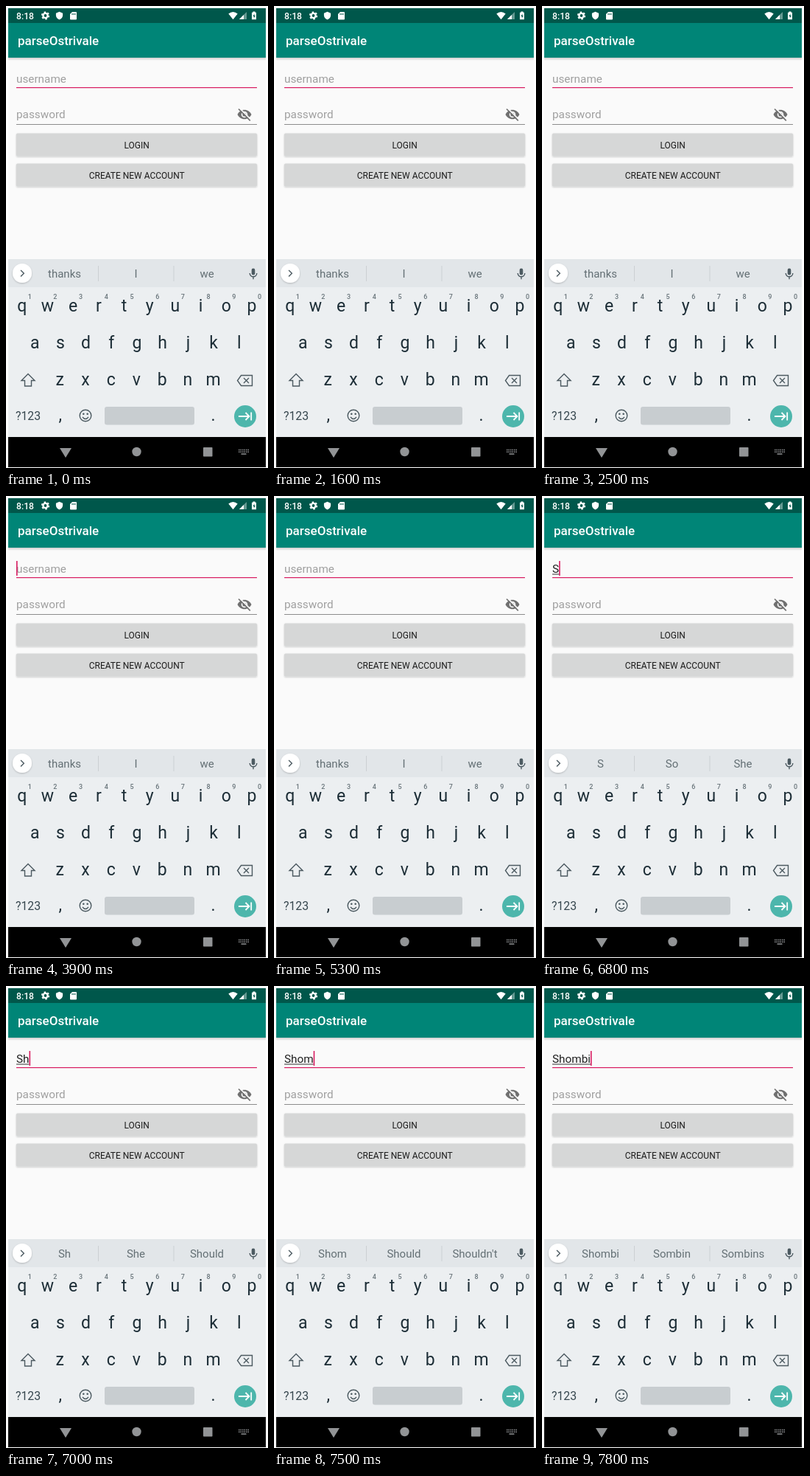
Write an HTML page that moves like this. It is 356 by 626 pixels and loops after 8000 ms.

```html
<!DOCTYPE html>
<html lang="en">
<head>
<meta charset="utf-8">
<title>Login</title>
<style>
  html, body { margin: 0; width: 100%; height: 100%; overflow: hidden; background: #fff; }
  svg { display: block; width: 356px; height: 626px; font-family: Roboto, sans-serif; }
  .mid { text-anchor: middle; }
  .medium { font-weight: 500; }
  .field { font-size: 15.3px; }
  .hint { fill: #a0a0a0; }
  .button { font-size: 12px; fill: #1c1c1c; }
  .word { font-size: 15px; fill: #647075; }
  .key { font-size: 23px; fill: #1c2d36; }
  .digit { font-size: 9px; font-weight: 500; fill: #68747a; }
  .line { fill: none; stroke: #4c5a61; stroke-width: 1.4; }
</style>
</head>
<body>
<svg viewBox="0 0 356 626">
  <defs>
    <linearGradient id="shade" x2="0" y2="1">
      <stop stop-color="#000" stop-opacity=".18"/>
      <stop offset="1" stop-color="#000" stop-opacity="0"/>
    </linearGradient>
    <filter id="lift" x="-20%" y="-20%" width="140%" height="150%">
      <feDropShadow dx="0" dy="1" stdDeviation=".8" flood-opacity=".22"/>
    </filter>
  </defs>

  <rect x="3" y="3" width="350" height="622" fill="#fafafa"/>
  <rect x="3" y="3" width="350" height="20" fill="#00574b"/>
  <rect x="3" y="23" width="350" height="47" fill="#008577"/>
  <rect x="3" y="70" width="350" height="4" fill="url(#shade)"/>

  <g fill="#fff">
    <text class="medium" x="14" y="17.5" font-size="12.2">8:18</text>
    <circle cx="53.5" cy="13" r="3.1" fill="none" stroke="#fff" stroke-width="2.4"/>
    <circle cx="53.5" cy="13" r="4.8" fill="none" stroke="#fff" stroke-width="1.6" stroke-dasharray="2.5 2.53"/>
    <path d="M72.5 7.8l4.6 2v3c0 2.6-1.9 4.7-4.6 5.6c-2.7-.9-4.6-3-4.6-5.6v-3z"/>
    <path d="M90 8h5q1 0 1 1v8.5q0 1-1 1h-7q-1 0-1-1v-6.5z"/>
    <path d="M90 10v2m2-2v2m2-2v2" stroke="#00574b"/>
    <path d="M302.3 10.4q6.2-5 12.4 0L308.5 18.2z"/>
    <path d="M327 8v10h-10z" fill-opacity=".4"/>
    <path d="M323 12v6h-6z"/>
    <path d="M335.5 7.5h3v1.2h1.5v9.6h-6v-9.6h1.5z"/>
    <path d="M337.5 10.5l-2 3.5h1.3v2.5l2-3.5h-1.3z" fill="#00574b"/>
    <text class="medium" x="16" y="53" font-size="17">parseOstrivale</text>
  </g>

  <rect x="14" y="110" width="327" height="1.2" fill="#d81b60"/>
  <text class="field hint" id="hint" x="14" y="104">username</text>
  <text class="field" id="typed" x="14" y="104" fill="#222"></text>
  <rect id="rule" x="14" y="105.5" height="1" fill="#333"/>
  <rect id="caret" y="88" width="1.6" height="20" fill="#d81b60"/>

  <text class="field hint" x="14" y="152">password</text>
  <rect x="14" y="160" width="327" height="1" fill="#8c8c8c"/>
  <g fill="#707070">
    <path d="M314.5 147c1.6-3.7 5.3-6.3 9.5-6.3s7.9 2.6 9.5 6.3c-1.6 3.7-5.3 6.3-9.5 6.3s-7.9-2.6-9.5-6.3z"/>
    <circle cx="324" cy="147" r="4.3" fill="#fafafa"/>
    <circle cx="324" cy="147" r="2.6"/>
    <path d="M317.5 138.7l15.5 15.5" stroke="#fafafa" stroke-width="1.8"/>
    <path d="M316 139.5l15.8 15.8" stroke="#707070" stroke-width="1.7"/>
  </g>

  <g fill="#d6d7d7" filter="url(#lift)">
    <rect x="14" y="172.5" width="327" height="31" rx="1.5"/>
    <rect x="14" y="213.5" width="327" height="31" rx="1.5"/>
  </g>
  <text class="button mid" x="177.7" y="192.5">LOGIN</text>
  <text class="button mid" x="177.7" y="233.5">CREATE NEW ACCOUNT</text>

  <rect x="3" y="343" width="350" height="241" fill="#eceff1"/>
  <rect x="3" y="343" width="350" height="38" fill="#e2e6e9"/>
  <circle cx="22" cy="362" r="13" fill="#fff" filter="url(#lift)"/>
  <path class="line" d="M20 358l4.3 4.3l-4.3 4.3"/>
  <path d="M125.5 352v21M228 352v21" stroke="#cbd0d3"/>
  <g id="words"></g>
  <rect x="333.7" y="355.5" width="4.6" height="9" rx="2.3" fill="#4c5a61"/>
  <path class="line" d="M331.2 362a4.8 4.8 0 0 0 9.6 0M336 367v3.3"/>
  <g id="keys"></g>

  <path class="line" d="M30 498.5l9 9h-4.5v7.5h-9v-7.5h-4.5z"/>
  <path class="line" d="M319.5 500.5h15v14h-15l-5-7z"/>
  <path class="line" d="M323 504l7 7m0-7l-7 7"/>
  <text x="13" y="561" font-size="15.8" fill="#37474f">?123</text>
  <circle class="line" cx="108" cy="555" r="7.8"/>
  <path class="line" d="M104 557q4 5 8 0"/>
  <g fill="#4c5a61"><circle cx="105.3" cy="552.8" r="1.3"/><circle cx="110.7" cy="552.8" r="1.3"/></g>
  <rect x="134" y="543" width="122" height="24.5" rx="3" fill="#c8cdd0"/>
  <circle cx="325" cy="556" r="15" fill="#4db6ac"/>
  <path d="M316 556h14.5m-5-5l5 5l-5 5M333.2 550.5v11" fill="none" stroke="#fff" stroke-width="1.8"/>

  <rect x="3" y="584" width="350" height="41" fill="#000"/>
  <g fill="#929496">
    <path d="M73 599h16l-8 13z"/>
    <circle cx="177.5" cy="604" r="6.2"/>
    <rect x="268" y="598" width="12.5" height="12.5" rx=".8"/>
    <path d="M316 601.5h14M316 604.2h14" stroke="#929496" stroke-width="1.5" stroke-dasharray="1.5 1"/>
    <path d="M319.5 607h7" stroke="#929496" stroke-width="1.5"/>
  </g>
</svg>
<script>
const $ = id => document.getElementById(id);
const LOOP = 8000;
const KEY_STEP = 34.7;

function addText(parent, cls, x, y, label = '') {
  const el = document.createElementNS('http://www.w3.org/2000/svg', 'text');
  el.setAttribute('class', cls + ' mid');
  el.setAttribute('x', x);
  el.setAttribute('y', y);
  el.textContent = label;
  return parent.appendChild(el);
}

function addRow(cls, letters, x, y) {
  [...letters].forEach((c, i) => addText($('keys'), cls, x + i * KEY_STEP, y, c));
}
addRow('key', 'qwertyuiop', 21.7, 413.5);
addRow('key', 'asdfghjkl', 39.2, 463.5);
addRow('key', 'zxcvbnm', 73.3, 514);
addRow('key', ',', 73.7, 562);
addRow('key', '.', 281.5, 562);
addRow('digit', '1234567890', 32.2, 397);

const slots = [79.5, 176.5, 273].map(x => addText($('words'), 'word', x, 368));

// Caret toggles while the field is idle, starting hidden
const blinks = [200, 700, 1100, 1600, 2100, 2500, 3000, 3400, 3900, 4400, 4800, 5300, 5800];

// Start time, field text, suggestions
const steps = [
  [0, '', 'thanks I we'],
  [6000, 'S', 'thanks I we'],
  [6100, '', 'thanks I we'],
  [6700, 'S', 'thanks I we'],
  [6800, 'S', 'S So She'],
  [6900, 'Sh', 'S So She'],
  [7000, 'Sh', 'Sh She Should'],
  [7200, 'Sho', 'Sho She Should'],
  [7500, 'Shom', "Shom Should Shouldn't"],
  [7600, 'Shomb', "Shom Should Shouldn't"],
  [7700, 'Shomb', "Shomb Should Shouldn't"],
  [7800, 'Shombi', 'Shombi Sombin Sombins']
];

function draw(t) {
  const [, text, words] = steps.findLast(s => s[0] <= t);
  const blinkOn = t < 6000 && blinks.filter(b => b <= t).length % 2 === 1;
  $('typed').textContent = text;
  const width = text ? $('typed').getComputedTextLength() : 0;
  $('hint').style.visibility = text ? 'hidden' : 'visible';
  $('rule').setAttribute('width', width);
  $('caret').setAttribute('x', 14 + width);
  $('caret').style.visibility = text || blinkOn ? 'visible' : 'hidden';
  words.split(' ').forEach((w, i) => slots[i].textContent = w);
}

let start;
function tick(now) {
  start ??= now;
  draw(Math.max(0, now - start) % LOOP);
  requestAnimationFrame(tick);
}
draw(0);
requestAnimationFrame(tick);
</script>
</body>
</html>
```
